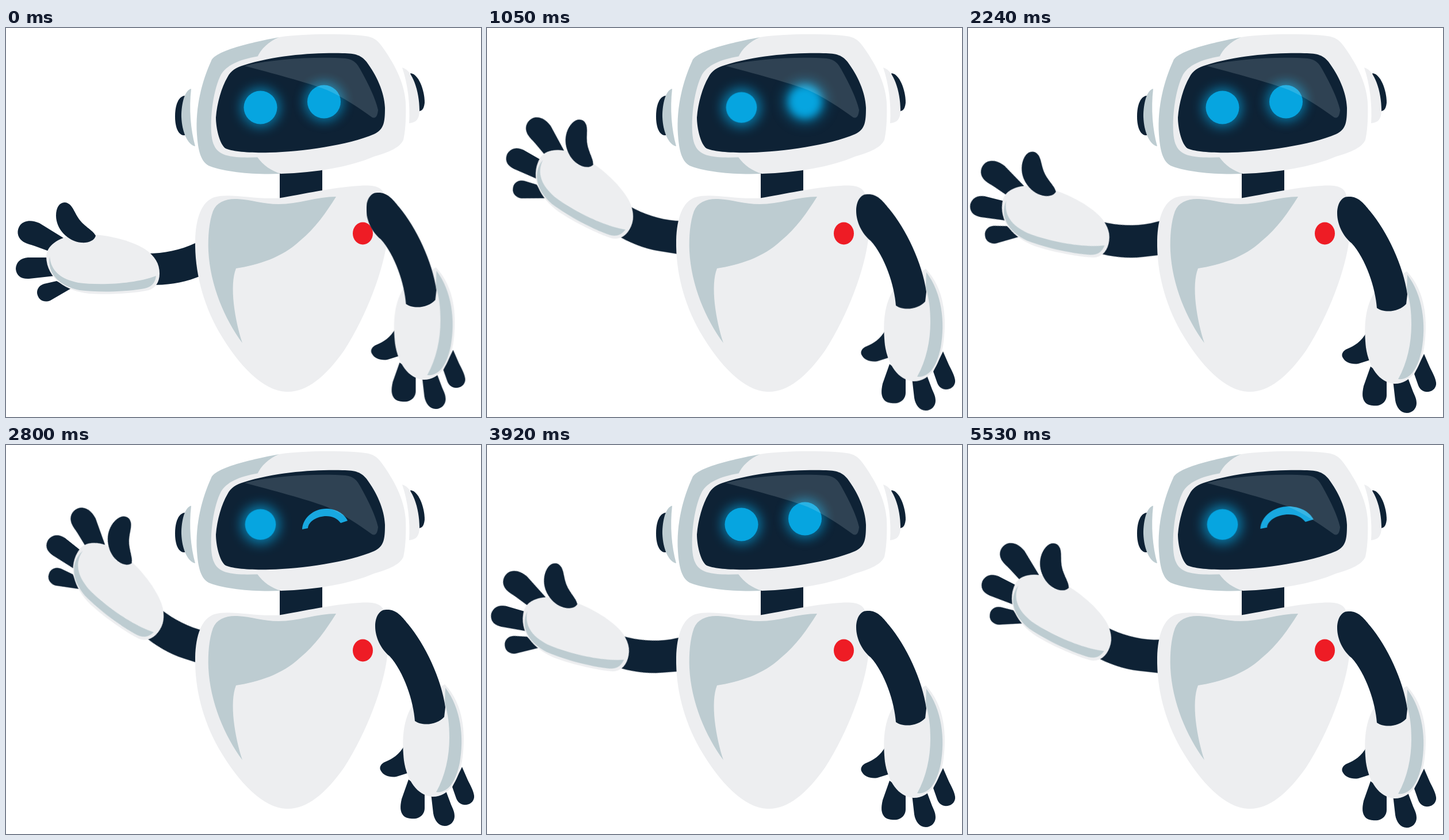
Animation, 826 px wide and 678 px high, one loop 5600 ms. Source, as an HTML page:

```html
<!DOCTYPE html>
<html lang="en">
<head>
<meta charset="utf-8">
<title>Waving robot</title>
<style>
  html, body { margin: 0; width: 100%; height: 100%; overflow: hidden; background: #fff; }
  svg {
    display: block; width: 826px; height: 678px;
    --low: translate(-14px, -15px) rotate(14.2deg);
    --mid: translate(-15px, 1px) rotate(26.8deg);
    --high: translate(0, 0) rotate(40.2deg);
  }
  .navy { fill: #0e2235; }
  .shell { fill: #edeef0; }
  .shade { fill: #bdccd1; }
  .light { fill: #06a5e0; }
  .halo { opacity: .65; filter: blur(10px); }

  /* Every part shares one clock; the script below scrubs it. */
  #leftArm, #rightArm, #leftEye, #rightEye, #wink {
    --cycle: 2310ms 280ms infinite ease-in-out paused;
  }
  #leftArm { transform-origin: 409px 375px; animation: raise 280ms ease-in-out paused, wave var(--cycle); }
  #rightArm { animation: settle 280ms ease-in-out paused, bob var(--cycle); }
  #leftEye { transform-origin: 442.5px 138.5px; animation: squint var(--cycle); }
  #rightEye { animation: reopen var(--cycle); }
  #wink { transform-origin: 554px 161px; opacity: 0; animation: wink var(--cycle); }

  @keyframes raise { from { transform: translate(0, 0) rotate(0deg); } to { transform: var(--low); } }
  @keyframes wave {
    0%, 54.5%, 82%, 100% { transform: var(--low); }
    11%, 41%, 69.7% { transform: var(--high); }
    29.5% { transform: var(--mid); }
  }
  @keyframes settle { from { transform: translate(-15.5px, -3px); } to { transform: translate(0, 4px); } }
  @keyframes bob {
    0%, 82%, 100% { transform: translate(0, 4px); }
    9% { transform: translate(0, -3px); }
    27% { transform: translate(0, 0); }
    45%, 70% { transform: translate(0, -1px); }
  }
  @keyframes squint {
    0%, 39%, 100% { transform: scale(1); }
    6%, 33% { transform: scale(.924); }
  }
  @keyframes reopen {
    0% { opacity: .85; filter: blur(0); }
    3%, 28% { opacity: 0; filter: blur(8px); }
    33.3% { opacity: 1; filter: blur(7px); }
    39%, 100% { opacity: 1; filter: blur(0); }
  }
  @keyframes wink {
    0%, 18% { opacity: 1; transform: scale(1); }
    27.3% { opacity: 1; transform: scale(1.17, 1.08); }
    33%, 100% { opacity: 0; transform: scale(1.17, 1.08); }
  }
</style>
</head>
<body>
<svg viewBox="0 0 826 678">
  <g id="leftArm">
    <path class="navy" d="M245 393C275 393 303 387 329 375L385 345L410 405L331 435C305 445 280 448 250 448Z"/>
    <path class="navy" d="M100 366L58 340C45 334 32 335 25 343C18 352 19 364 28 371C34 376 42 377 50 380L80 391Z"/>
    <path class="navy" d="M78 400L38 400C25 401 17 409 17 420C18 432 27 438 40 437L85 432Z"/>
    <path class="navy" d="M88 441L66 446C56 449 52 458 55 466C58 475 67 479 77 475L113 454Z"/>
    <path class="shell" d="M70 399C70 380 90 365 120 361C160 356 211 367 241 385C259 397 267 411 267 428C267 443 260 453 248 457C222 463 175 465 145 463C104 459 71 436 70 399Z"/>
    <path class="shade" d="M76 398C78 424 96 438 126 444C165 449 224 446 261 432C259 446 252 453 235 455C204 460 159 461 128 457C94 450 71 429 76 398Z"/>
    <path class="navy" d="M87 327C87 313 93 304 102 304C114 305 117 317 125 330C135 346 150 351 156 362C154 371 142 375 131 374C108 372 87 351 87 327Z"/>
  </g>

  <path class="navy" d="M476 240H550V300H476Z"/>

  <path class="shell" d="M362 295C390 287 429 299 475 296.500C515 290 572 277 615 275C643 273 655 278 658 292C665 315 667 345 663 368C657 420 628 500 588 562C555 609 521 636 487 634C448 632 406 591 370 529C342 479 328 424 329 370C330 331 340 303 362 295Z"/>
  <path class="shade" d="M574 294C541 294 508 307 474 307C447 307 426 299 402 298C382 297 366 304 360 319C353 338 351 364 352 389C355 448 380 507 411 549C398 510 388 449 400 419C439 413 480 400 511 371C538 349 557 321 574 294Z"/>
  <ellipse cx="620.5" cy="358" rx="17.5" ry="19.5" fill="#ee1c25"/>

  <g id="rightArm">
    <path class="navy" d="M693 526C684 543 672 550 660 555C652 558 648 565 652 571C656 579 668 583 679 581L698 575Z"/>
    <path class="navy" d="M700 586L688 620C685 634 685 643 692 650C697 654 706 655 713 654C722 652 728 645 728 636V607Z"/>
    <path class="navy" d="M739 610L743 645C745 657 752 667 763 667C773 667 780 659 780 650C780 642 777 637 774 630L765 606Z"/>
    <path class="navy" d="M776 599L783 619C786 627 793 631 801 630C809 629 815 622 814 614C813 606 808 597 803 587L793 564Z"/>
    <path class="shell" d="M706 458C688 487 689 525 692 553C697 587 715 614 741 616C769 617 786 590 793 554C800 506 796 455 763 420Z"/>
    <path class="shade" d="M764 426C791 462 797 512 789 557C782 590 769 610 748 608C764 580 771 545 771 513C771 491 769 473 763 453Z"/>
    <path class="navy" d="M661 290C678 289 687 300 699 315C729 351 757 410 764 460L762 477C751 490 725 494 711 484C709 451 692 398 667 371C652 359 642 338 642 319C642 303 649 290 661 290Z"/>
  </g>

  <path class="navy" d="M311 118C300 119 294 134 294 154C294 174 300 188 311 187Z"/>
  <path class="shade" d="M322 106C311 108 305 131 305 155C306 181 316 204 329 206C321 177 318 141 322 106Z"/>
  <path class="navy" d="M703 79C717 79 728 108 728 130C727 140 724 145 717 145Z"/>
  <path class="shell" d="M689 69C707 73 719 111 719 143C719 158 714 165 701 166C703 134 699 99 689 69Z"/>

  <path class="shell" d="M475 16C525 9 591 10 625 14C638 16 645 20 653 31C674 60 693 94 695 130C696 150 695 178 691 195C685 208 668 216 640 224C598 242 540 252 478 254L425 240L428 38Z"/>
  <path class="shade" d="M475 16C457 23 443 37 437 51L420 150L437 225C447 239 461 249 478 254C436 256 385 252 355 241C339 235 334 214 332 185C329 137 341 92 357 57C365 38 438 23 475 16Z"/>
  <path class="shell" d="M440 49C403 55 383 66 374 81C361 106 355 151 357 182C359 213 371 222 401 225C427 227 468 224 510 219L560 48Z"/>
  <path class="navy" d="M413 65C470 47 535 43 585 44C609 44 618 48 627 59C644 82 658 111 659 139C659 165 657 177 640 185C596 204 513 216 459 217C421 218 393 215 382 210C371 203 365 173 365 156C367 130 375 103 385 86C391 74 400 69 413 65Z"/>

  <g class="light">
    <circle class="halo" cx="442.5" cy="138.5" r="34"/>
    <circle id="leftEye" cx="442.5" cy="138.5" r="29"/>
    <g id="rightEye">
      <circle class="halo" cx="553" cy="128.5" r="34"/>
      <circle cx="553" cy="128.5" r="29"/>
    </g>
    <path id="wink" fill="#18a8e0" d="M515 147C516 127 535 111 557 111C573 111 588 119 594 132L582 136C576 128 568 124 557 124C541 124 526 133 525 145Z"/>
  </g>
  <path d="M415 66C473 52 547 50 590 53C606 55 611 63 616 72C631 99 643 124 647 143C646 152 644 158 637 156C612 138 585 120 558 108C521 94 463 79 415 66Z" fill="#f0ffff" fill-opacity=".15"/>
</svg>

<script>
const LOOP = 5600, STEP = 70;
const parts = document.getAnimations();

function tick() {
  const time = Math.floor(performance.now() % LOOP / STEP) * STEP;
  for (const part of parts) part.currentTime = time;
  requestAnimationFrame(tick);
}
tick();
</script>
</body>
</html>
```
